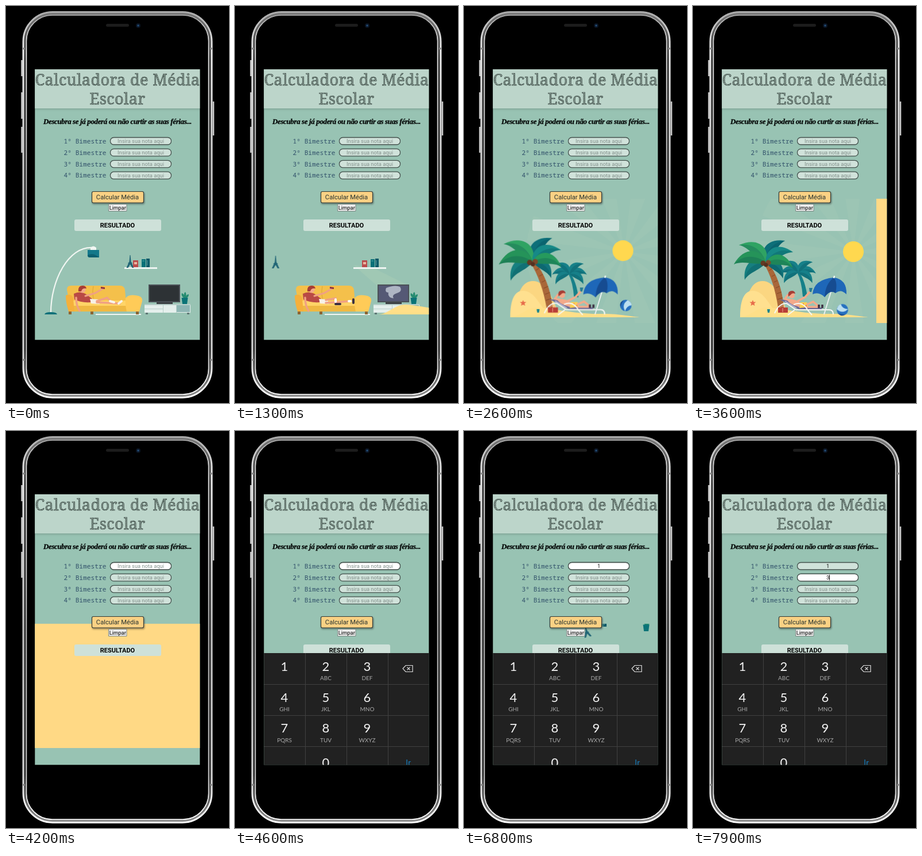
Animation of 388 by 690 pixels, one loop 8 s. Source, as an HTML page:

```html
<!DOCTYPE html>
<html lang="pt-BR">
<head>
<meta charset="utf-8">
<title>Calculadora de Média Escolar</title>
<style>
html, body { margin: 0; width: 100%; height: 100%; overflow: hidden; background: #000; }
svg { display: block; width: 100vw; height: 100vh; }
text { font-family: Roboto, sans-serif; text-anchor: middle; }
.title { font: 27.2px "Noto Serif", serif; letter-spacing: .3px; fill: url(#hatch); stroke: #26332f; stroke-width: .5; }
.lead { font: italic bold 13px "Liberation Serif", serif; letter-spacing: -.38px; fill: #050908; stroke: #050908; stroke-width: .3; }
.label { font: 11.2px "Noto Sans Mono", monospace; fill: #31516a; text-anchor: start; }
.hint { font-size: 9.3px; fill: #83918c; }
.value { font-size: 9.3px; fill: #111; }
.digit { font: 22px Lato, sans-serif; fill: #f4f4f4; }
.letters { font: 10px Lato, sans-serif; fill: #aaa; }

.move { animation: 8s linear infinite; }
.lamp { animation-name: lamp; transform-origin: 78px 534px; }
.tower { animation-name: tower; transform-origin: 216px 444px; }
.books { animation-name: books; }
.red { animation-name: red; }
.shelf { animation-name: shelf; }
.plant { animation-name: plant; }
.sofa { animation-name: sofa; transform-origin: 170px 536px; }
.tv { animation-name: tv; }
.ground { animation-name: ground; transform-origin: 81px 541px; }
.hill { animation-name: hill; transform-origin: 120px 541px; }
.palm { animation-name: palm; transform-origin: 152px 520px; }
.sprout { animation-name: sprout; transform-origin: 194px 500px; }
.sun { animation-name: sun; transform-origin: 279px 427px; }
.rays { animation-name: rays; transform-origin: 279px 427px; }
.lounger { animation-name: lounger; transform-origin: 200px 538px; }
.canopy { animation-name: canopy; transform-origin: 237px 488px; }
.ball { animation-name: ball; transform-origin: 260px 528px; }
.wipe { animation-name: wipe; }
.keys { animation-name: keys; }

@keyframes lamp { 0%, 7% { transform: none; animation-timing-function: ease-in } 15%, 100% { transform: translate(-120px, 10px) rotate(-25deg) } }
@keyframes tower {
  0%, 12.5% { transform: none; animation-timing-function: ease-in }
  16.25% { transform: translate(-145px, 1px) } 18%, 80% { transform: translate(-200px, 1px) }
  80.01%, 84% { transform: translate(-6px, -140px) rotate(-25deg) }
  85% { transform: translate(-3px, -97px) rotate(-15deg) } 88%, 100% { transform: none }
}
@keyframes books {
  0%, 17% { transform: none } 22%, 80% { transform: translateX(-230px) }
  80.01%, 84% { transform: translate(-2px, -150px) } 85% { transform: translate(-2px, -114px) } 88%, 100% { transform: none }
}
@keyframes red { 0%, 16.5% { transform: none } 21%, 86% { transform: translateX(-220px) } 90%, 100% { transform: none } }
@keyframes shelf { 0%, 18% { transform: none } 23%, 86% { transform: translateX(-230px) } 90%, 100% { transform: none } }
@keyframes plant {
  0%, 18% { transform: none } 22%, 80% { transform: translateX(60px) }
  80.01%, 84% { transform: translate(6px, -205px) } 85% { transform: translate(6px, -171px) } 89%, 100% { transform: none }
}
@keyframes sofa { 0%, 19% { transform: none; animation-timing-function: ease-in } 24%, 100% { transform: scale(0) } }
@keyframes tv { 0%, 18% { transform: none; animation-timing-function: ease-in } 23%, 100% { transform: translateX(110px) } }
@keyframes ground { 0%, 13.5% { transform: translateX(260px) } 16.25% { transform: translate(168px, -5px) } 22%, 26.25% { transform: translateX(-21px) scale(1.12, 1) } 33%, 100% { transform: none } }
@keyframes hill { 0%, 19% { transform: translateX(-14px) scale(1.18, 0) } 23%, 26.25% { transform: translateX(-14px) scale(1.18, 1) } 33%, 100% { transform: none } }
@keyframes palm { 0%, 20% { transform: translate(-110px, 30px) rotate(-50deg) scale(1.3) } 26.25% { transform: translate(-20px, 11px) rotate(-8deg) scale(1.3) } 34%, 100% { transform: none } }
@keyframes sprout { 0%, 23% { transform: scale(0) } 26.25% { transform: translate(4px, 20px) scale(.75, .65) } 33%, 100% { transform: none } }
@keyframes sun { 0%, 20% { transform: translate(-30px, 20px) scale(0) } 24% { transform: translate(-18px, -8px) scale(1.05) } 26.25% { transform: translate(-13px, -9px) scale(1.03) } 34%, 100% { transform: none } }
@keyframes rays { 0%, 27% { opacity: 0; transform: none } 33% { opacity: .05 } 52%, 100% { opacity: .05; transform: rotate(30deg) } }
@keyframes lounger { 0%, 22% { transform: translateX(200px) scale(1.4, 1.2) } 25%, 26.25% { transform: translateX(-8px) scale(1.4, 1.2) } 33%, 100% { transform: none } }
@keyframes canopy { 0%, 22% { transform: translate(100px, -50px) rotate(60deg) scale(.5, 1) } 26.25% { transform: translate(-5px, 12px) rotate(25deg) scale(.48, 1.15) } 31% { transform: rotate(0) scale(1.08) } 33%, 100% { transform: none } }
@keyframes ball {
  0%, 24% { transform: translate(95px, -160px) } 26.25% { transform: translate(69px, -125px); animation-timing-function: ease-in }
  32% { transform: translate(25px, 0) rotate(-120deg); animation-timing-function: ease-out }
  35% { transform: translate(12px, -28px) rotate(-180deg); animation-timing-function: ease-in }
  38%, 100% { transform: rotate(-240deg) }
}
@keyframes wipe { 0%, 43.7% { transform: translateX(288px) } 45% { transform: translateX(270px) } 49%, 53.7% { transform: none } 57.4%, 100% { transform: translateX(-290px) } }
@keyframes keys { 0%, 52.5% { transform: translateY(196px); animation-timing-function: ease-out } 57.3%, 100% { transform: none } }
</style>
</head>
<body>
<svg viewBox="0 0 388 690" preserveAspectRatio="none">
<defs>
  <clipPath id="screen"><path d="M50.300 110h287v470.300h-287z"/></clipPath>
  <clipPath id="stage"><path d="M50 335h288v216h-288z"/></clipPath>
  <pattern id="hatch" width="2.4" height="2.4" patternUnits="userSpaceOnUse" patternTransform="rotate(28)">
    <path d="M0 0h2.400v1.200h-2.400z" fill="#43524c"/><path d="M0 1.200h2.400v1.200h-2.400z" fill="#9db2a8"/>
  </pattern>
  <linearGradient id="rim" x2="0" y2="1">
    <stop stop-color="#aaa"/><stop offset=".1" stop-color="#f4f4f4"/><stop offset=".5" stop-color="#c8c8c8"/>
    <stop offset=".88" stop-color="#ddd"/><stop offset="1" stop-color="#fff"/>
  </linearGradient>
  <linearGradient id="bevel" x2="0" y2="1">
    <stop stop-color="#777"/><stop offset=".12" stop-color="#3c3c3c"/><stop offset=".88" stop-color="#333"/><stop offset="1" stop-color="#8c8c8c"/>
  </linearGradient>
  <filter id="shadow" x="-10%" y="-30%" width="120%" height="180%"><feDropShadow dx="1" dy="2" stdDeviation="1.5" flood-opacity=".4"/></filter>
  <filter id="soft" x="-10%" y="-30%" width="120%" height="180%"><feDropShadow dx="0" dy="1" stdDeviation="2" flood-opacity=".22"/></filter>
  <g id="leaf"><path d="M0 0C6-22 36-32 56 3C40-5 18 6 0 0z"/><path d="M0 0C18-14 40-14 56 3C40-5 18 6 0 0z" fill="#003b48" opacity=".22"/></g>
</defs>

<path d="M0 0h388v690h-388z"/>
<g fill="none">
  <path d="M27.500 94v28M27.500 150v46M27.500 210v45M361 166v59" stroke="#d0d0d0" stroke-width="2.4"/>
  <rect x="33" y="14" width="322" height="663" rx="47" stroke="url(#bevel)" stroke-width="5"/>
  <rect x="30" y="10.500" width="328" height="670" rx="51" stroke="url(#rim)" stroke-width="2.8"/>
  <rect x="35.500" y="16" width="317" height="659" rx="45" stroke="url(#rim)" stroke-width="1.600"/>
  <path d="M28 74h5M355 74h5M28 615h5M355 615h5" stroke="#888" stroke-width="3"/>
</g>
<rect x="174" y="31" width="40" height="5" rx="2.5" fill="#1c1c1c"/>
<circle cx="230" cy="34" r="4" fill="#0b1524"/><circle cx="230" cy="34" r="1.7" fill="#244f79"/>

<g clip-path="url(#screen)">
  <path d="M50 110h288v471h-288z" fill="#98c3b3"/>
  <path d="M50 110h288v68h-288z" fill="#bcd5ca" filter="url(#soft)"/>
  <text class="title" x="194" y="138">Calculadora de Média</text>
  <text class="title" x="194" y="171">Escolar</text>
  <text class="lead" x="194" y="205">Descubra se já poderá ou não curtir as suas férias...</text>

  <g clip-path="url(#stage)">
    <!-- living room -->
    <g data-on="0 2000">
      <g class="move lamp">
        <path d="M78 533C78 478 108 417 151 420" fill="none" stroke="#f1f6f2" stroke-width="2.2"/>
        <path d="M67 536q1-4 11-4t11 4z" fill="#0f7079"/>
        <path d="M147 424v-4q5-5 10 0v4z" fill="#f1f6f2"/><path d="M142 424h20v13h-16q-4 0-4-4z" fill="#13788a"/><path d="M142 433q10-5 20 4h-16q-4 0-4-4z" fill="#0c5f70"/>
      </g>
      <path data-on="700 1900" d="M249 488L206 450L246 458L303 486z" fill="#cfe6bd" opacity=".14"/>
      <g class="move tv">
        <path d="M248 484h55v31h-55z" fill="#4b5157"/><path d="M250 486h51v27h-51z" fill="#2d3235"/>
        <g data-on="700 2000"><path d="M250 486h51v27h-51z" fill="#555975"/><path d="M263 490q15-6 24-2q5 8-5 11q-10 3-6 9q-11-1-9-10q-7 0-4-8z" fill="#aeb5c3"/></g>
        <path d="M262 515h28v3h-28z" fill="#3b4044"/>
        <path d="M241 518h80v15h-80z" fill="#e4efec"/><path d="M241 518h80v2h-80zM241 526h33v1h-33zM273 520h1v13h-1zM296 520h1v13h-1z" fill="#b9d0cb"/>
        <path d="M297 520h23v12h-23z" fill="#8eb6b4"/><path d="M243 533h4v3h-4zM315 533h4v3h-4z" fill="#5f7775"/>
      </g>
      <g class="move sofa">
        <path d="M156 535h79v2h-79z" fill="#f0f6f3"/>
        <path d="M109 530h5v6h-5zM147 530h5v6h-5zM226 530h5v6h-5z" fill="#8b6635"/>
        <path d="M113 486h85q8 0 9 8l3 32h-98l-6-33q0-7 7-7z" fill="#f4c04b"/>
        <path d="M152 487q-3 15 2 26" fill="none" stroke="#dda535"/>
        <path d="M112 512h103v18h-103z" fill="#ffd467"/><path d="M112 521h103v10h-103z" fill="#efb943"/>
        <path d="M104 503q11-4 13 6l2 22h-10q-5-15-5-28z" fill="#f5b03c"/>
        <path d="M208 508q5-7 18-5q12 1 11 10l-5 18h-22q-3-13-2-23z" fill="#ffcb58"/>
        <path d="M118 500q10-5 20 0l12 9-3 6q-17 1-28-5z" fill="#b94a45"/>
        <path d="M122 507q0 13 6 23" fill="none" stroke="#f0a183" stroke-width="3.500" stroke-linecap="round"/>
        <path d="M138 504l17-5 14-8" fill="none" stroke="#f0a183" stroke-width="3" stroke-linecap="round"/><path d="M165 488l7 1v3l-7-1z" fill="#8b3340"/>
        <circle cx="133" cy="493" r="5.500" fill="#f3aa8a"/><path d="M126 496q-1-10 7-10q6 0 7 5q-8-1-9 5z" fill="#a63d35"/>
        <path d="M146 509l15 1 2 8-15-1z" fill="#f7f1e7"/>
        <g data-on="0 1000" fill="none" stroke-linecap="round"><path d="M158 513l18-6 7 7M158 515l20 1 20 1" stroke="#f0a183" stroke-width="3.500"/><path d="M181 513l7 2M196 517l5-4" stroke="#f8f3eb" stroke-width="4"/></g>
        <g data-on="1000 2000" fill="none" stroke-linecap="round"><path d="M158 511l17-3 1 8M158 516l43-3" stroke="#f0a183" stroke-width="3.500"/><path d="M175 510v4M198 513h3" stroke="#fff" stroke-width="4"/><path d="M175 518h8M206 516v-6" stroke="#3c3042" stroke-width="4"/></g>
      </g>
    </g>
    <path class="move shelf" d="M206 454h57v3h-57z" fill="#edf4f1"/>
    <path class="move tower" d="M215.500 433h1l1 11 5 11h-3l-3.500-6-3.500 6h-3l5-11zM212.500 446h7v1.500h-7z" fill="#216576"/>
    <g class="move red"><path d="M221 442h9v12h-9z" fill="#ba4c4c"/><path d="M223 445h5v4h-5z" fill="#e9b6a0"/></g>
    <g class="move books"><path d="M236 440h7v14h-7z" fill="#087078"/><path d="M244 439h6v15h-6z" fill="#0b5867"/><path d="M237 443h4M246 442v9" stroke="#5aa5a4"/></g>
    <g class="move plant"><path d="M311 508q-7-3-5-9q5 2 5 9q-3-9 1-11q3 4 0 11q1-7 6-7q0 6-6 7z" fill="#258c70"/><path d="M305.500 507h11l-1.500 11h-8z" fill="#0b7377"/></g>

    <!-- beach -->
    <g data-on="1100 4100">
      <g class="move rays"><circle cx="279" cy="427" r="85" fill="none" stroke="#fffbd0" stroke-width="170" pathLength="24" stroke-dasharray="1 1"/></g>
      <circle class="move sun" cx="279" cy="427" r="18" fill="#ffd84f"/>
      <g class="move sprout" fill="#168089">
        <path d="M181 463q8 15 10 42h8q-4-28-14-42z"/>
        <g transform="translate(183 463) scale(.55)">
          <use href="#leaf"/><use href="#leaf" transform="rotate(34)"/><use href="#leaf" transform="rotate(-38)"/>
          <use href="#leaf" transform="scale(-1 1)"/><use href="#leaf" transform="scale(-1 1) rotate(34)"/><use href="#leaf" transform="scale(-1 1) rotate(-38)"/>
        </g>
      </g>
      <g class="move hill">
        <path d="M88 541C92 500 102 478 121 478C142 478 156 508 167 541z" fill="#fbd681"/>
        <path d="M82 541C82 513 88 495 104 495C124 495 134 522 150 541z" fill="#ffe08f"/>
        <path d="M104 511l1.500 3.500 4 0-3 2.500 1 4-3.500-2-3.500 2 1-4-3-2.500 4 0z" fill="#e76d4b"/>
      </g>
      <g class="move palm">
        <path d="M123 447Q141 477 148 524H158Q154 476 130 445z" fill="#a96739"/>
        <path d="M132 460l5-3M137 470l6-3M141 480l6-3M144 490l7-3M146 500l8-3M147 510l9-3" stroke="#844824"/>
        <g transform="translate(127 446)">
          <use href="#leaf" fill="#11757c" transform="rotate(40) scale(.72)"/>
          <use href="#leaf" fill="#167f80" transform="scale(-1 1) rotate(36) scale(.85)"/>
          <use href="#leaf" fill="#0d6f79" transform="rotate(-52) scale(.9)"/>
          <use href="#leaf" fill="#2fa363" transform="scale(-1 1) rotate(-36)"/>
          <use href="#leaf" fill="#259359" transform="scale(-1 1) rotate(0)"/>
          <use href="#leaf" fill="#168987" transform="rotate(-24) scale(.9)"/>
          <use href="#leaf" fill="#269a5d" transform="rotate(8) scale(.85)"/>
          <circle cx="-5" cy="1" r="4.500" fill="#633922"/><circle cx="4" cy="0" r="4.500" fill="#7b492a"/><circle cx="0" cy="4" r="3.500" fill="#55301f"/>
        </g>
      </g>
      <path class="move ground" d="M81 541C100 541 108 524 129 524C154 525 190 535 232 535C270 534 290 540 308 541z" fill="#ffdf88"/>
      <g data-on="1800 4100">
        <g class="move lounger">
          <path d="M150 510l16 1 22 12 36 1v4l-40-1z" fill="#6c6996"/>
          <path d="M160 513l20 12M170 511l15 12" stroke="#b8b4d2" stroke-width="2"/>
          <path d="M167 509q12 0 21 8l-3 6q-14-3-20-10z" fill="#f3aa8a"/>
          <path d="M187 515l11 0 3 8-16 2z" fill="#ffd151"/><path d="M191 518h2M196 521h2" stroke="#d87840" stroke-width="2"/>
          <g fill="none" stroke="#f3aa8a" stroke-width="3.500" stroke-linecap="round"><path d="M198 519l11-5 10 8M199 523h20M182 513l13-7 8-9M170 512l-10-3 5-7"/></g>
          <path d="M202 490h6l-2 7h-3z" fill="#287b93"/><path d="M219 519v6M225 519v6" stroke="#3d3042" stroke-width="3.500"/>
          <circle cx="172" cy="503" r="5" fill="#f3aa8a"/><path d="M166 505q-2-10 6-10q5 0 6 5q-6-2-8 2z" fill="#a63d35"/>
          <path d="M142 534q8-18 21-17l16 11h58q7 0 7 8M165 537l12-9M207 537l-8-9M175 519q16-7 25 10" fill="none" stroke="#f5f7f4" stroke-width="2"/>
          <path d="M148 524h17v9h-17z" fill="#b83d37"/><path d="M151 524q5-6 10 0M156 525v7" stroke="#e9a78a" fill="none"/>
          <path data-on="2300 4100" d="M129 527h5l-1 6h-3z" fill="#14838c"/>
        </g>
      </g>
      <g data-on="1900 4100">
        <path data-on="2250 4100" d="M247 474L228 536" stroke="#e9efef" stroke-width="2"/>
        <g class="move canopy">
          <path d="M208 501Q210 475 245 472Q268 475 267 501Q257 491 248 499Q239 492 229 506Q219 496 208 501z" fill="#1e67b8"/>
          <path d="M245 472Q230 483 229 506Q239 492 248 499Q252 480 245 472z" fill="#164c91"/><path d="M245 473l1-4" stroke="#fff" stroke-width="2"/>
        </g>
      </g>
      <g class="move ball"><circle cx="260" cy="528" r="10" fill="#2670c0"/><path d="M254 520q13 4 10 17q-8 2-11-2q6-6 1-15z" fill="#bcdff0"/><path d="M264 519q9 5 5 13q-1-8-5-13z" fill="#174a8e"/></g>
    </g>
    <path class="move wipe" d="M50 335h288v216h-288z" fill="#ffd985"/>
  </g>

  <g id="form"></g>
  <g filter="url(#shadow)"><rect x="149.500" y="322.500" width="90" height="19.500" rx="2.500" fill="#fad184" stroke="#343a36" stroke-width="1.200"/></g>
  <text x="194" y="336" font-size="11.2" fill="#25322f">Calcular Média</text>
  <path d="M178.500 344.500h31.500v12h-31.500z" fill="#ececec" stroke="#7b8782"/>
  <text x="194.300" y="353.500" font-size="9.4">Limpar</text>
  <rect x="119" y="371" width="151" height="20" rx="3" fill="#cee1d9"/>
  <text x="194" y="385" font-size="11" font-weight="700">RESULTADO</text>

  <g class="move keys">
    <path d="M50 386h288v196h-288z" fill="#212121"/>
    <path data-on="6000 6300" d="M50 386h72v54h-72z" fill="#424242"/>
    <path data-on="7400 7600" d="M194 386h72v54h-72z" fill="#424242"/>
    <path d="M122.500 386v196M194.500 386v196M266.500 386v196M50 440.500h288M50 494.500h288M50 548.500h288" stroke="#404040" fill="none"/>
    <g id="pad"></g>
    <path d="M292 413l5-5.500h12v11h-12zM299.500 410.500l5 5M304.500 410.500l-5 5" fill="none" stroke="#dedede" stroke-width="1.200"/>
    <text x="301.500" y="582" font-size="15" fill="#1678b5">Ir</text>
  </g>
</g>
</svg>
<script>
const LOOP = 8000;

// Each field: when it has focus, when its value appears, the value, and its caret times.
const fields = [
  { focus: [4200, 7000], typed: 6000, value: "1", carets: [[5000, 5400]] },
  { focus: [7000, 8000], typed: 7400, value: "3", carets: [[7100, 7400], [7500, 8000]] },
  {}, {}
];

document.querySelector("#form").innerHTML = fields.map((f, i) => {
  const y = 228.5 + i * 19.9;
  const box = fill => `<rect x="181.500" y="${y}" width="106" height="12.500" rx="6" fill="${fill}" stroke="#45524e" stroke-width="1.300"/>`;
  const focus = f.focus ? `<g data-on="${f.focus.join(" ")}">${box("#fff")}</g>` : "";
  const value = f.value ? `<text class="value" x="234.500" y="${y + 9.5}" data-on="${f.typed} ${LOOP}">${f.value}</text>` : "";
  const carets = (f.carets || []).map(([from, to]) =>
    `<path d="M${from < f.typed ? 234.5 : 237.5} ${y + 1.5}v9.500" stroke="#111" data-on="${from} ${to}"/>`).join("");
  return `<text class="label" x="100.500" y="${y + 10.2}">${i + 1}º Bimestre</text>${box("#d0e2da")}${focus}
    <text class="hint" x="234.500" y="${y + 9.5}" data-on="0 ${f.typed || LOOP}">Insira sua nota aqui</text>${value}${carets}`;
}).join("");

const letters = ["", "ABC", "DEF", "GHI", "JKL", "MNO", "PQRS", "TUV", "WXYZ"];
document.querySelector("#pad").innerHTML = letters.map((word, i) => {
  const x = 86 + i % 3 * 72, y = 417 + Math.floor(i / 3) * 53.7;
  return `<text class="digit" x="${x}" y="${y}">${i + 1}</text><text class="letters" x="${x}" y="${y + 16.3}">${word}</text>`;
}).join("") + '<text class="digit" x="158" y="584">0</text>';

for (const el of document.querySelectorAll("[data-on]")) {
  const [from, to] = el.dataset.on.split(" ").map(Number);
  const shown = getComputedStyle(el).opacity;
  const key = (time, opacity) => ({ offset: time / LOOP, opacity, easing: "step-end" });
  const frames = [key(from, shown)];
  if (from > 0) frames.unshift(key(0, 0));
  frames.push(to < LOOP ? key(to, 0) : key(LOOP, shown));
  if (to < LOOP) frames.push(key(LOOP, 0));
  el.animate(frames, { duration: LOOP, iterations: Infinity });
}

// One shared start keeps every part in step.
const start = document.timeline.currentTime ?? 0;
document.getAnimations().forEach(a => { a.startTime = start; });
</script>
</body>
</html>
```
